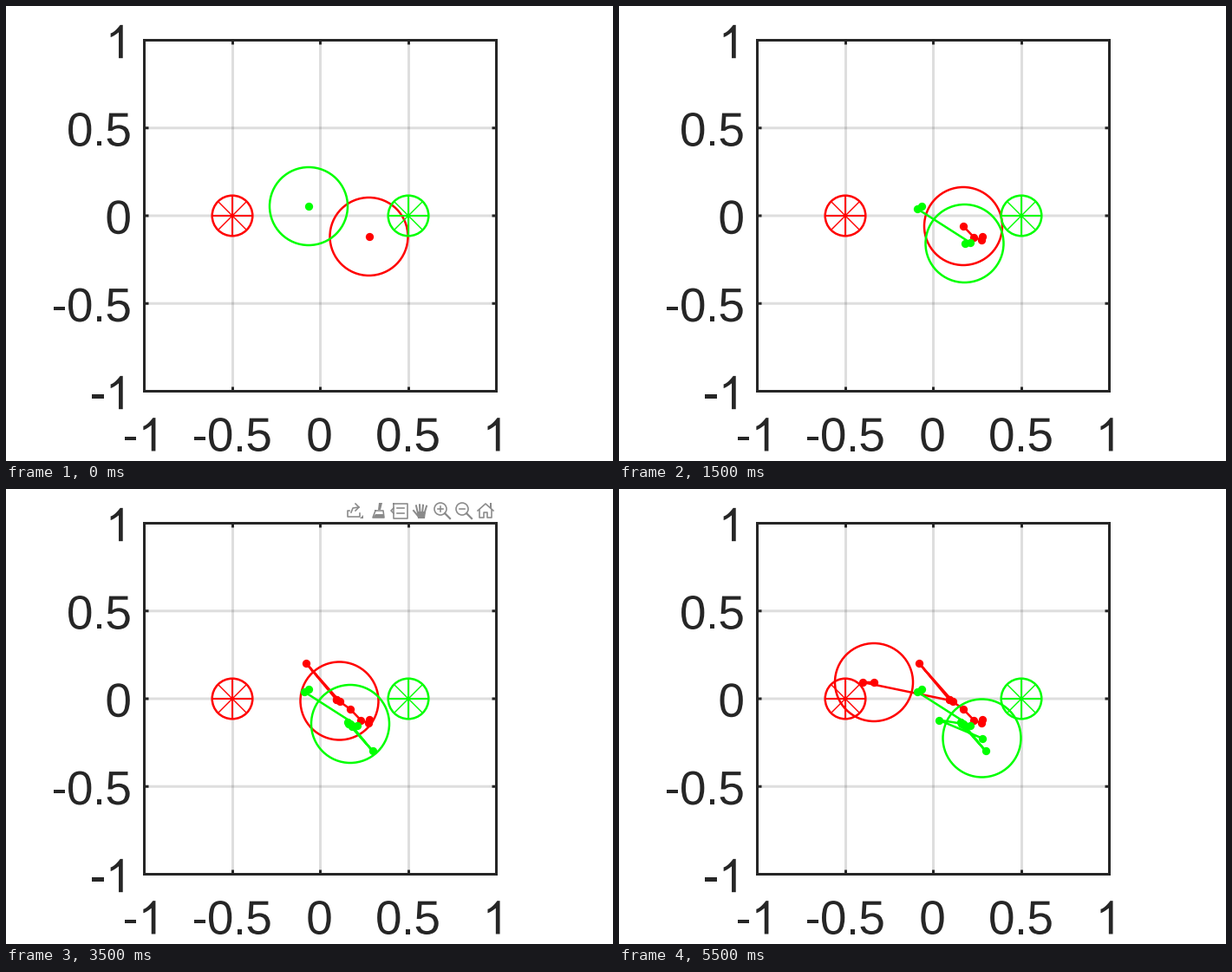
Recreate the animation shown at these times as a matplotlib script. Size 700 by 525 pixels, loop 6.5 s.

```python
import numpy as np
import matplotlib.pyplot as plt
from matplotlib.animation import FuncAnimation
from matplotlib.patches import Circle, PathPatch, Polygon, Rectangle
from matplotlib.path import Path
from matplotlib.textpath import TextPath

W, H, DPI = 700, 525, 100
PT = 72 / DPI                      # points per pixel
RED, GREEN, INK, GRAY = "#ff0000", "#00ff00", "#262626", "#8a8a8a"
LINE = 2.5
STEPS = 13

fig = plt.figure(figsize=(W / DPI, H / DPI), dpi=DPI, facecolor="white")
ax = fig.add_axes([0, 0, 1, 1])
ax.set_xlim(0, W)
ax.set_ylim(H, 0)
ax.axis("off")


def line(xs, ys, color, width, z, **kw):
    return ax.plot(xs, ys, color=color, lw=width * PT, zorder=z,
                   snap=False, **kw)[0]


def ring(x, y, r, color, z, width=LINE):
    return ax.add_patch(Circle((x, y), r, fill=False, ec=color,
                               lw=width * PT, zorder=z))


# --- plot box, grid, ticks ---
X0, X1, Y0, Y1 = 159.5, 565.5, 39.5, 444.5
TICK = 5
xt = np.floor(np.linspace(X0, X1, 5)) + 0.5
yt = np.linspace(Y0, Y1, 5)

for x, y in zip(xt[1:-1], yt[1:-1]):
    grid = dict(color=INK, width=3, z=1, alpha=0.15)
    tick = dict(color=INK, width=3, z=8, solid_capstyle="butt")
    line([x, x], [Y0, Y1], **grid)
    line([X0, X1], [y, y], **grid)
    for edge, d in ((Y0, TICK), (Y1, -TICK)):
        line([x, x], [edge, edge + d], **tick)
    for edge, d in ((X0, TICK), (X1, -TICK)):
        line([edge, edge + d], [y, y], **tick)
ax.add_patch(Rectangle((X0, Y0), X1 - X0, Y1 - Y0, fill=False, ec=INK,
                       lw=3 * PT, zorder=8, snap=False))

# --- tick labels ---
EM, GLYPH = 53.33, 55              # pen spacing and glyph size in pixels
ADVANCE = {"-": 0.333, ".": 0.278}


def footless_one():
    """Outline of a plain digit one: a stem with a curved flag."""
    t = np.linspace(0, 1, 12)
    top = np.c_[223 + 424 * t, 1104 + 368 * t ** 1.5]
    low = np.c_[223 + 360 * t, 930 + 217 * t ** 1.3][::-1]
    stem = [(763, 1472), (763, 0), (583, 0)]
    return Path(np.vstack([top, stem, low]) * EM / 2048)


def advance(c):
    return EM * ADVANCE.get(c, 0.556)


def label(s, x, base, align):
    x -= align * sum(map(advance, s))
    for c in s:
        if c == "1":
            shape, shift = footless_one(), 0
        else:
            shape = TextPath((0, 0), c, size=GLYPH,
                             prop={"family": "Liberation Sans"})
            shift = (1 - GLYPH / EM) * advance(c) / 2
        pts = shape.vertices * (1, -1) + (x + shift, base)
        ax.add_patch(PathPatch(Path(pts, shape.codes), fc=INK, lw=0))
        x += advance(c)


for value, x, y in zip(np.linspace(-1, 1, 5), xt, yt[::-1]):
    label(f"{value:g}", x - 1, 513.5, 0.5)
    label(f"{value:g}", 144.5, y + 20.7, 1)


# --- fixed goals ---
def goal(x, y, color, r=23.3):
    ring(x, y, r, color, 6)
    for a in np.arange(4) * np.pi / 4:
        u = np.array([np.cos(a), np.sin(a)])
        dx, dy = r * u
        line([x - dx, x + dx], [y - dy, y + dy], color, 2 * abs(u).max(), 6,
             solid_capstyle="butt")


goal(261, 242, RED)
goal(464, 242, GREEN)


# --- toolbar: each icon is drawn around its own centre ---
class Icon:
    parts = []

    def __init__(self, slot):
        self.at = np.array([403 + 25 * slot, 25])

    def stroke(self, *pts, width=1.6):
        xs, ys = (np.array(pts) + self.at).T
        self.parts.append(line(xs, ys, GRAY, width, 9))

    def fill(self, *pts):
        self.parts.append(ax.add_patch(
            Polygon(np.array(pts) + self.at, fc=GRAY, lw=0, zorder=9)))

    def box(self, x, y, w, h):
        self.stroke((x, y), (x + w, y), (x + w, y + h), (x, y + h), (x, y))


def export(i):
    i.stroke((-7, 0), (-9, 0), (-9, 7), (5, 7), (5, 3))
    i.stroke((-5, 2), (-3, -3), (4, -4))
    i.stroke((0, -8), (4, -4), (0, 0))
    i.fill((9, 5), (9, 9), (5, 9))


def brush(i):
    i.fill((2, -9), (6, -9), (4, -1), (1, -1))
    i.stroke((-2, 0), (7, 0), (8, 8), (-5, 8), (-2, 0))
    i.fill((-2, 4), (7, 4), (8, 8), (-5, 8))


def data_tip(i):
    i.box(-6, -8, 16, 17)
    i.stroke((-6, -3), (-9, 0), (-6, 3))
    for y in (-3, 3):
        i.stroke((-2, y), (6, y))


def hand(i):
    for k in range(4):
        i.stroke((-3 + 2.5 * k, 3), (-5 + 4 * k, -7 + abs(k - 1.3)), width=2)
    i.stroke((-8, 0), (-3, 6), width=2)
    i.fill((-4, 1), (6, 1), (5, 9), (-3, 9))


def zoom(i, plus):
    x, y = i.at + (-2, -2)
    i.parts.append(ring(x, y, 7, GRAY, 9, 1.6))
    i.stroke((3, 3), (9, 9), width=2.2)
    i.stroke((-5, -2), (1, -2))
    if plus:
        i.stroke((-2, -5), (-2, 1))


def home(i):
    i.stroke((-9, 0), (0, -8), (9, 0))
    i.stroke((-7, -1), (-7, 8), (-2, 8), (-2, 2), (2, 2), (2, 8), (7, 8),
             (7, -1))
    i.stroke((6, -8), (6, -4), width=2)


tools = [export, brush, data_tip, hand, lambda i: zoom(i, True),
         lambda i: zoom(i, False), home]
for slot, tool in enumerate(tools):
    tool(Icon(slot))


# --- players: one visited point per step, the last one is held ---
class Player:
    def __init__(self, stops, color, z):
        self.stops = np.array(stops)
        self.ring = ring(*stops[0], 45, color, z)
        self.trail = line([], [], color, LINE, z, marker="o",
                          ms=9.3 * PT, mew=0)

    def show(self, step):
        pts = self.stops[:step + 1]
        self.ring.center = tuple(pts[-1])
        self.trail.set_data(*pts.T)


players = [
    Player([(418.5, 266), (417.5, 270), (409, 266.5), (397, 254), (381, 242.5),
            (381, 243), (346, 201), (384.5, 244.5), (281, 223), (294, 223)],
           RED, 4),
    Player([(349, 231), (344, 234), (405, 273), (398.5, 274), (393.5, 269),
            (395, 271), (422.5, 302), (397, 271), (368.5, 266.5),
            (418.5, 287.5)], GREEN, 5),
]


def draw(step):
    for p in players:
        p.show(step)
    fade = np.clip((10.1 - step) / 2, 0, 1) if step >= 5 else 0
    for art in Icon.parts:
        art.set_alpha(fade)
    return [a for p in players for a in (p.ring, p.trail)] + Icon.parts


anim = FuncAnimation(fig, draw, frames=STEPS, interval=500,
                     repeat=True, repeat_delay=0, blit=False)
plt.show()
```
